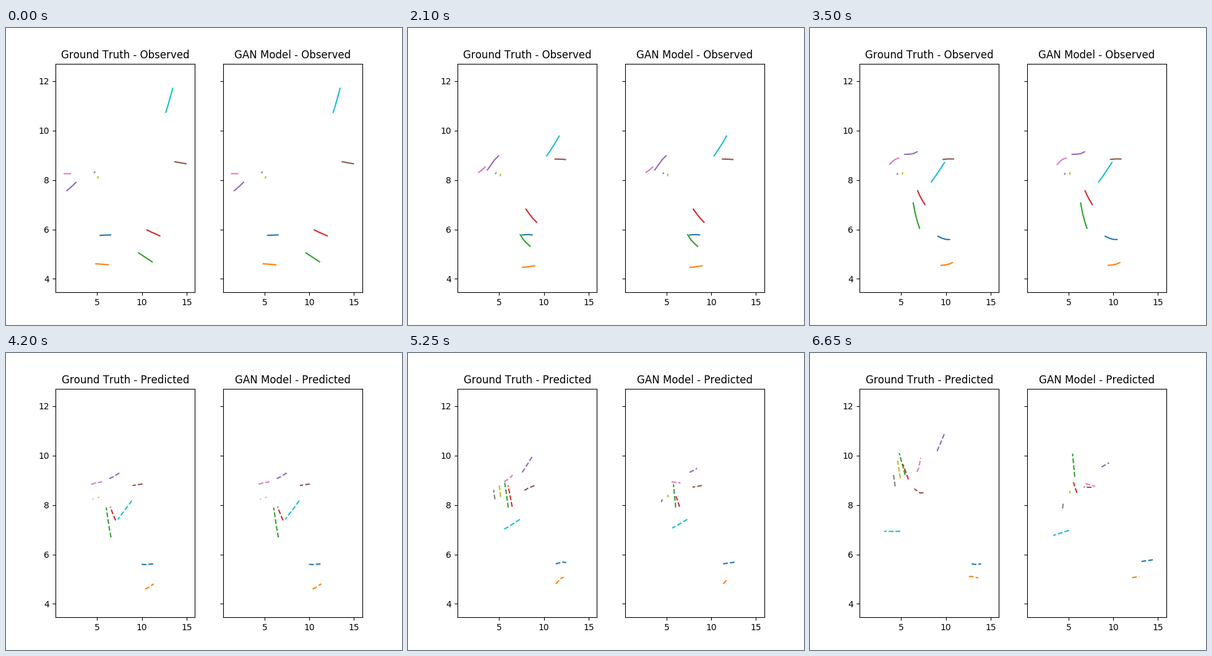
A matplotlib script that plays this animation: 640x480 px, repeating every 7 s.

```python
import numpy as np
import matplotlib.pyplot as plt
from matplotlib.animation import FuncAnimation

plt.rcParams["text.kerning_factor"] = 6

FRAMES, INTERVAL = 20, 350
SWITCH = 12    # first frame of the predicted phase
TAIL = 4       # points visible per trajectory
OBSERVED = 16  # samples both panels have in common
FUTURE = FRAMES + TAIL - 1 - OBSERVED


def spline(keys, count):
    """Sample a smooth curve through evenly timed key points."""
    keys = np.array(keys, dtype=float)
    u = np.linspace(0, len(keys) - 1, count)
    i = np.minimum(u.astype(int), len(keys) - 2)
    s = (u - i)[:, None]
    slope = np.gradient(keys, axis=0)
    ease = s * s * (3 - 2 * s)
    return (keys[i] * (1 - ease) + keys[i + 1] * ease
            + slope[i] * s * (1 - s) ** 2 - slope[i + 1] * s * s * (1 - s))


class Walker:
    """A shared past that branches into a true and a modelled future."""

    def __init__(self, past, truth, model):
        start = spline(past, OBSERVED)
        self.paths = [
            np.vstack([start, spline(past[-1:] + future, FUTURE + 1)[1:]])
            for future in (truth, model)
        ]


walkers = [
    Walker(past=[(5.34, 5.76), (6.51, 5.78), (7.58, 5.78),
                 (8.69, 5.78), (9.97, 5.6), (11.32, 5.62)],
           truth=[(12.24, 5.69), (13.13, 5.6), (13.94, 5.62)],
           model=[(14.51, 5.79)]),
    Walker(past=[(4.86, 4.61), (6.25, 4.57), (7.6, 4.47),
                 (8.97, 4.53), (10.37, 4.6), (11.34, 4.81)],
           truth=[(11.99, 5.05), (12.81, 5.11), (13.62, 5.05)],
           model=[(11.99, 5.04), (12.92, 5.1)]),
    Walker(past=[(11.15, 4.69), (9.64, 5.05), (8.46, 5.32),
                 (7.36, 5.79), (6.55, 6.69), (6.02, 7.9)],
           truth=[(5.54, 9.06), (4.78, 10.1)],
           model=[(5.45, 10.08)]),
    Walker(past=[(12.01, 5.74), (10.57, 5.98), (9.19, 6.29),
                 (8.0, 6.82), (7.07, 7.38), (6.46, 7.93)],
           truth=[(5.9, 8.92), (5.2, 9.65)],
           model=[(5.54, 8.92)]),
    Walker(past=[(1.62, 7.57), (2.64, 7.91), (3.69, 8.41),
                 (4.94, 8.98), (6.36, 9.07), (7.58, 9.32)],
           truth=[(8.86, 10.07), (9.85, 10.9)],
           model=[(9.53, 9.71)]),
    Walker(past=[(14.93, 8.66), (13.69, 8.74), (12.41, 8.83),
                 (11.25, 8.85), (10.07, 8.85), (8.96, 8.79)],
           truth=[(8.06, 8.65), (7.28, 8.48), (6.46, 8.66)],
           model=[(7.73, 8.72), (6.7, 8.73)]),
    Walker(past=[(1.33, 8.26), (2.0, 8.26), (2.7, 8.31),
                 (3.45, 8.53), (4.35, 8.84), (5.56, 8.94)],
           truth=[(6.32, 9.14), (6.9, 9.44), (7.19, 9.91)],
           model=[(6.73, 8.88), (7.97, 8.76)]),
    Walker(past=[(4.73, 8.32), (4.53, 8.23)],
           truth=[(4.36, 8.68), (4.14, 9.25)],
           model=[(4.41, 8.09), (4.31, 7.77)]),
    Walker(past=[(5.1, 8.08), (5.17, 8.33)],
           truth=[(4.95, 8.97), (4.61, 9.8)],
           model=[(5.17, 8.56)]),
    Walker(past=[(13.45, 11.71), (12.68, 10.74), (11.7, 9.78),
                 (10.32, 8.98), (8.88, 8.18), (7.32, 7.42)],
           truth=[(5.2, 6.97), (3.1, 6.94)],
           model=[(5.34, 7.02), (3.28, 6.77)]),
]

fig, axes = plt.subplots(1, 2, sharey=True, figsize=(6.4, 4.8), dpi=100)
panels = []
for ax, name in zip(axes, ("Ground Truth", "GAN Model")):
    ax.set(xlim=(0.345, 15.94), ylim=(3.456, 12.711),
           xticks=[5, 10, 15], yticks=range(4, 13, 2))
    lines = [ax.plot([], [], color=f"C{i}")[0] for i in range(len(walkers))]
    panels.append((ax, name, lines))


def update(frame):
    phase, style = ("Observed", "-") if frame < SWITCH else ("Predicted", "--")
    for side, (ax, name, lines) in enumerate(panels):
        ax.set_title(f"{name} - {phase}")
        for line, walker in zip(lines, walkers):
            line.set_data(*walker.paths[side][frame:frame + TAIL].T)
            line.set_linestyle(style)


anim = FuncAnimation(fig, update, frames=FRAMES, interval=INTERVAL,
                     repeat=True, repeat_delay=0)
plt.show()
```
